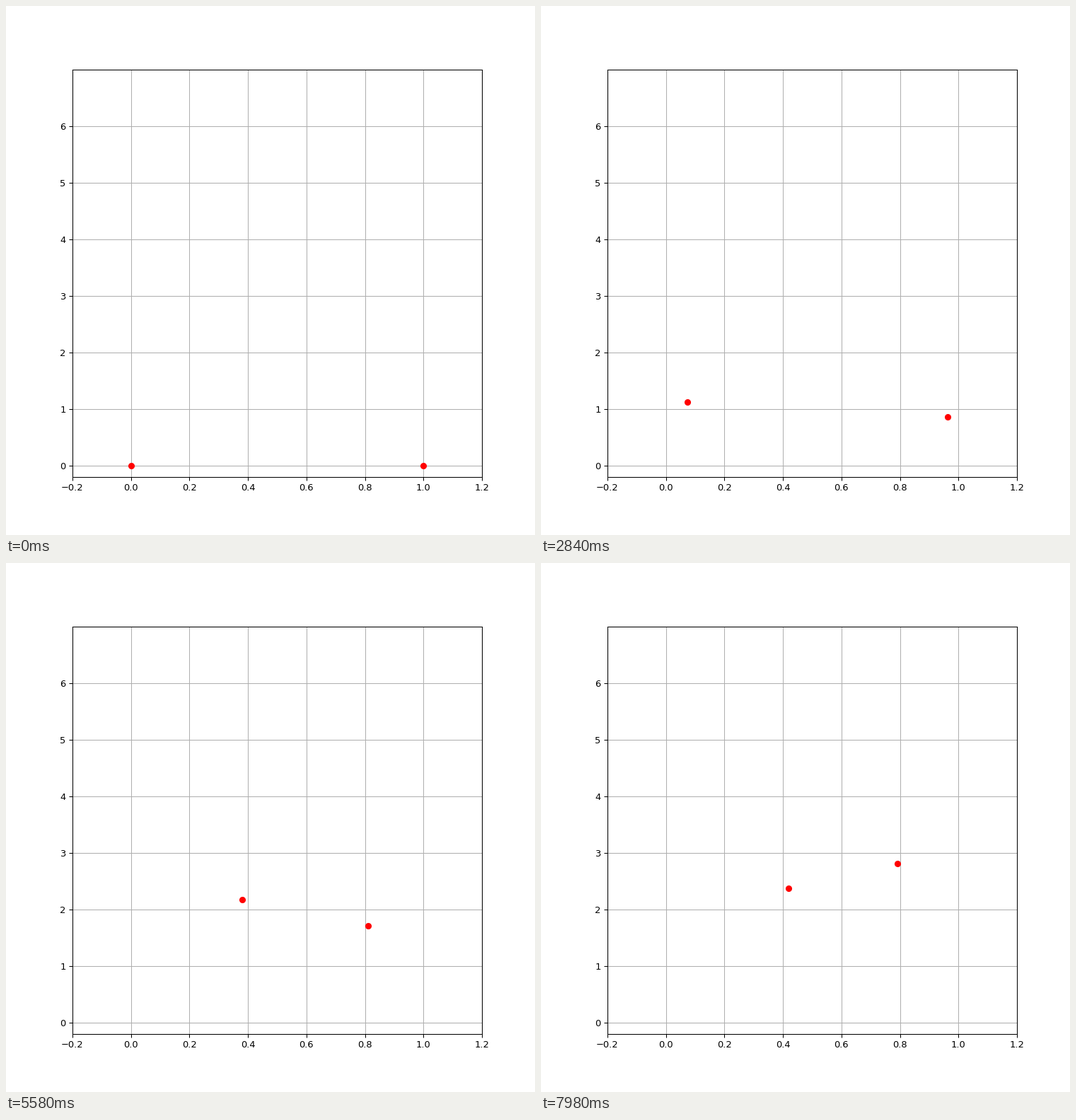
These frames come from a looping animation (748 px wide and 748 px high, 8 s). A matplotlib script:

```python
import numpy as np
import matplotlib.pyplot as plt
from matplotlib.animation import FuncAnimation

FRAMES = 400
STEP_MS = 20
DT = STEP_MS / 1000
STRENGTH = 0.5
MASS = np.array([[1.0], [2.0]])


def acceleration(pos):
    """Inverse-square attraction between the two bodies."""
    gap = pos[1] - pos[0]
    force = STRENGTH * gap / np.linalg.norm(gap) ** 3
    return np.array([force, -force]) / MASS


def simulate():
    """Velocity Verlet path, one row of two points per frame."""
    pos = np.array([[0.0, 0.0], [1.0, 0.0]])
    vel = np.array([[0.0, 0.0], [0.0, 0.5]])
    acc = acceleration(pos)
    path = [pos]
    for _ in range(FRAMES - 1):
        vel = vel + acc * DT / 2
        pos = pos + vel * DT
        acc = acceleration(pos)
        vel = vel + acc * DT / 2
        path.append(pos)
    return np.array(path)


path = simulate()

# 8 inches at 93.5 dpi gives 748 pixels
fig, ax = plt.subplots(figsize=(8, 8), dpi=93.5)
fig.subplots_adjust(left=0.1254)
ax.set_xlim(-0.2, 1.2)
ax.set_ylim(-0.2, 7)
ax.set_yticks(range(7))
ax.grid()
dots, = ax.plot(path[0, :, 0], path[0, :, 1], "ro")


def update(frame):
    dots.set_data(path[frame, :, 0], path[frame, :, 1])
    return dots,


anim = FuncAnimation(fig, update, frames=FRAMES, interval=STEP_MS,
                     repeat=True, repeat_delay=0)
plt.show()
```
